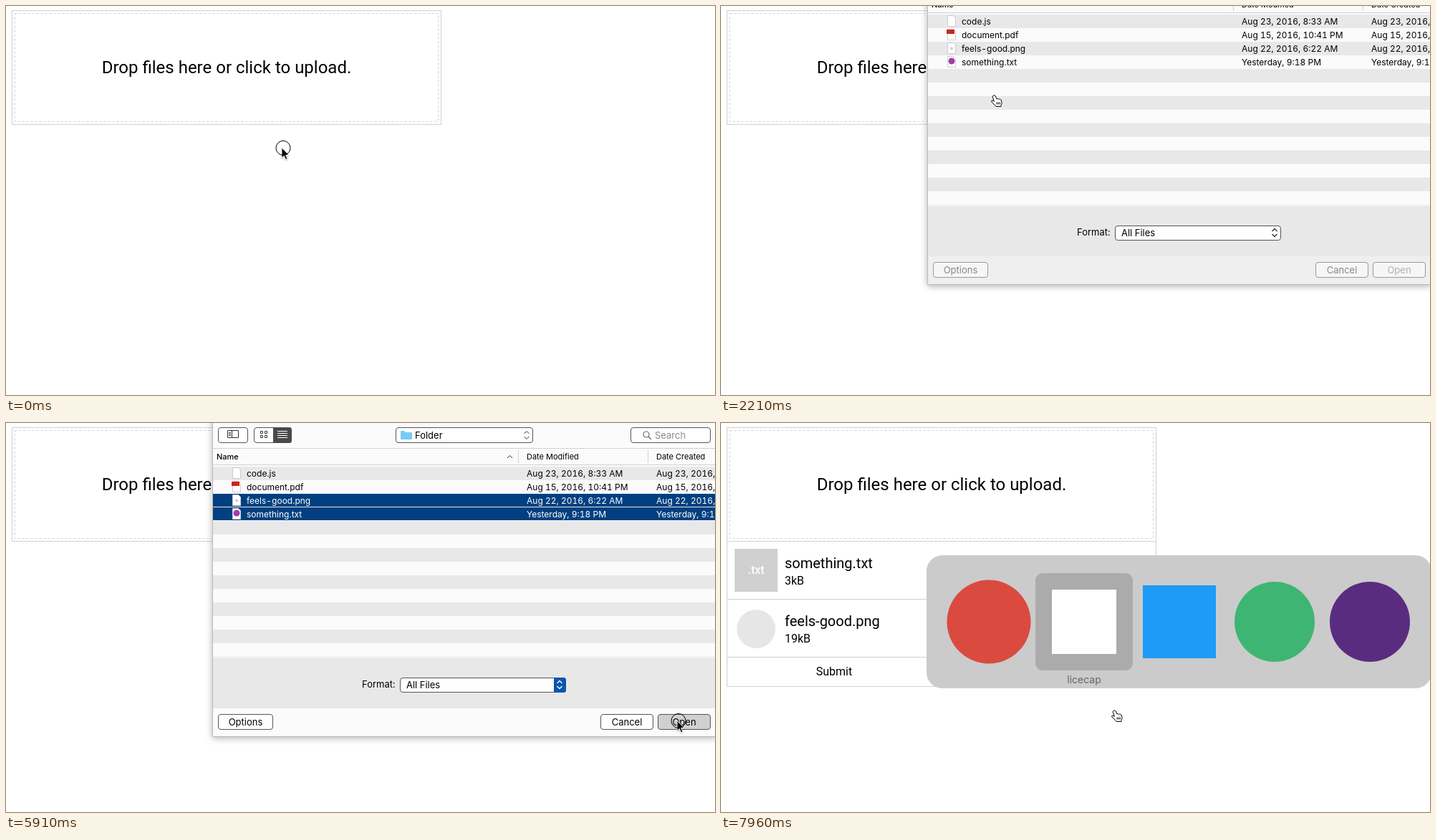
Recreate the animation shown at these times as an HTML page. Size 990x544 px, loop 8 s.

```html
<!DOCTYPE html>
<html lang="en">
<head>
<meta charset="utf-8">
<title>File upload</title>
<style>
  html, body { margin: 0; width: 100%; height: 100%; overflow: hidden; background: #fff; }
  svg { display: block; }
  text { font-family: Roboto, sans-serif; font-size: 16px; }
  .center { text-anchor: middle; }
  .title { font-size: 20px; }
  .prompt { font-size: 24px; }
  .ui text { font-family: Inter, sans-serif; font-size: 13px; font-variant-numeric: tabular-nums; }
  .ui .head { font-size: 11px; }
  .ui .cell { font-size: 12px; }
  .ui .app { font-size: 14px; }
  .sheet { filter: drop-shadow(0 3px 5px rgba(0, 0, 0, .3)); }
  .line { fill: none; stroke: #d0d0d0; }
  .control { fill: #fff; stroke: #555; }
  .icon { fill: none; stroke: #333; }
  .inactive .button { fill: #f6f6f6; stroke: #999; }
  .inactive .label { fill: #888; }
  .button.pressed { fill: #d0d0d0; }
  .inactive .label.disabled, .label.disabled { fill: #b0b0b0; }
  .inactive .accent { display: none; }
  .accent { fill: #0857ab; }
  .knob { fill: none; stroke: #fff; stroke-width: 1.4; }
  .inactive .knob { stroke: #333; }
  .mark { fill: #004080; visibility: hidden; }
  .selected { fill: #fff; }
  .selected .mark { visibility: visible; }
</style>
</head>
<body>
<svg id="stage" width="990" height="544" viewBox="0 0 990 544"></svg>
<script>
const stage = document.getElementById('stage');
const rect = (x, y, w, h, attrs) => `<rect x="${x}" y="${y}" width="${w}" height="${h}" ${attrs}/>`;
const frame = (x, y, w, h, attrs = 'class="control" rx="3.5"') => rect(x + .5, y + .5, w - 1, h - 1, attrs);
const text = (x, y, words, cls = '', attrs = '') => `<text x="${x}" y="${y}" class="${cls}" ${attrs}>${words}</text>`;
const path = (d, attrs = 'class="icon"') => `<path d="${d}" ${attrs}/>`;
const circle = (x, y, r, fill) => `<circle cx="${x}" cy="${y}" r="${r}" fill="${fill}"/>`;
const group = (id, content, attrs = '') => `<g id="${id}" ${attrs}>${content}</g>`;
const chevrons = (x, y, attrs) => path(`M${x - 3.5} ${y - 2}l3.5-3.5 3.5 3.5M${x - 3.5} ${y + 2}l3.5 3.5 3.5-3.5`, attrs);
const button = (x, w, words, id) =>
  frame(x, 407, w, 22, `id="${id}Button" class="control button" rx="3.5"`) +
  text(x + w / 2, 423, words, 'center label', `id="${id}Label"`);

const form =
  frame(8, 6, 600, 160, 'class="line"') +
  frame(12, 10, 592, 152, 'class="line" stroke-dasharray="3 3"') +
  text(308, 94, 'Drop files here or click to upload.', 'center prompt');

const uploads =
  path('M8.5 165V368.5H607.5V165M8 246.5H608M8 327.5H608', 'class="line"') +
  rect(19, 176, 60, 60, 'fill="#d0d0d0"') +
  text(49, 211, '.txt', 'center', 'fill="#fff" font-weight="500"') +
  text(89, 203, 'something.txt', 'title') + text(89, 226, '3kB') +
  circle(49, 288, 27, '#e6e6e6') +
  text(89, 284, 'feels-good.png', 'title') + text(89, 307, '19kB') +
  text(158, 353, 'Submit', 'center');

const toolbar =
  frame(296, 6, 42, 22) +
  path('M309.5 10.5h15v10h-15zM315.5 10v11M311 13.5h3M311 15.5h3M311 17.5h3') +
  frame(346, 6, 53, 22) +
  path('M373 6h22.500a3.500 3.500 0 0 1 3.500 3.500v15a3.500 3.500 0 0 1-3.500 3.500h-22.500z', 'fill="#4a4a4a"') +
  path('M355.500 11.500h3v3h-3zM361.500 11.500h3v3h-3zM355.500 17.500h3v3h-3zM361.500 17.500h3v3h-3z') +
  path('M379 11.500h14M379 14.500h14M379 17.500h14M379 20.500h14', 'stroke="#fff"') +
  frame(544, 6, 192, 22) +
  path('M551 12q0-1 1-1h4l2 2h8q1 0 1 1v8q0 1-1 1h-14q-1 0-1-1z', 'fill="#75cbf6"') +
  text(571, 22, 'Folder') + chevrons(727, 17) +
  frame(872, 6, 112, 22) +
  path('M898 16a4 4 0 1 1-8 0a4 4 0 1 1 8 0M897 19l4 4', 'fill="none" stroke="#666" stroke-width="1.2"') +
  text(906, 22, 'Search', '', 'fill="#8a8a8a"') +
  path('M288 35.500H990M288 58.500H990M715.500 38v18M896.500 38v18', 'class="line"') +
  text(294, 51, 'Name', 'head', 'font-weight="500"') +
  path('M700 49l3.500-3.500 3.500 3.500') +
  text(727, 51, 'Date Modified', 'head') + text(908, 51, 'Date Created', 'head');

const files = [
  ['code.js', 'Aug 23, 2016, 8:33 AM', ''],
  ['document.pdf', 'Aug 15, 2016, 10:41 PM', rect(315, 82, 11, 6, 'fill="#c8281e"')],
  ['feels-good.png', 'Aug 22, 2016, 6:22 AM', circle(322, 108.500, 2, '#ccc')],
  ['something.txt', 'Yesterday, 9:18 PM', circle(322, 126, 4.500, '#a23ca8')],
];
const stripes = Array.from({ length: 7 }, (_, i) => rect(288, 61 + 38 * i, 702, 19, 'fill="#e8e8e8"')).join('');
const rows = files.map(([name, date, badge], i) => {
  const y = 61 + 19 * i;
  return group('row' + i,
    rect(288, y, 702, 18, 'class="mark"') +
    path(`M316.500 ${y + 1.500}h8l3 3v12h-11z`, 'fill="#fff" stroke="#ccc"') + badge +
    text(336, y + 14, name, 'cell') + text(727, y + 14, date, 'cell') + text(908, y + 14, date, 'cell'));
}).join('');

const dialog =
  rect(288, -20, 704, 458, 'class="sheet" fill="#fbfbfb"') +
  rect(288, 399, 702, 39, 'id="footer"') +
  toolbar + stripes + rows +
  rect(288, 327, 702, 72, 'fill="#e8e8e8"') + path('M288 328.500H990', 'stroke="#f6f6f6"') +
  path('M288.500 0V438.500H990', 'fill="none" stroke="#bbb"') +
  text(497, 370, 'Format:') + frame(550, 356, 232, 21) + text(559, 371, 'All Files') +
  path('M765 356h13.500a3.500 3.500 0 0 1 3.500 3.500v14a3.500 3.500 0 0 1-3.500 3.500h-13.500z', 'class="accent"') +
  chevrons(773, 366, 'class="knob"') +
  button(296, 77, 'Options', 'options') + button(830, 74, 'Cancel', 'cancel') + button(910, 74, 'Open', 'open');

const switcher =
  rect(287, 185, 705, 186, 'rx="22" fill="#cbcbcb"') +
  rect(439, 210, 136, 136, 'rx="10" fill="#ababab"') +
  circle(374, 278, 58.500, '#db4a3f') +
  rect(462, 233, 90, 90, 'fill="#fff"') +
  rect(589, 227, 102, 102, 'fill="#1e9bf6"') +
  circle(773, 278, 56, '#3fb573') +
  circle(906, 278, 56, '#5a2c80') +
  text(507, 364, 'licecap', 'center app', 'fill="#666"');

const pointer =
  group('arrow', path('M0 0V14.500L3.300 11.500 5.600 16.800 8 15.700 5.700 10.500H10Z',
    'stroke="#fff" style="filter: drop-shadow(0 1px 1px rgba(0, 0, 0, .3))"')) +
  group('hand', path('M3.600 1.200q1.600-1 2.600.6l1.800 4.200q1.200-.9 2.300.2q1.400-.7 2.200.5q1.600-.4 2 1.200l.5 3.500q0 2-1 3.200v1.900h-7l-3-3.500-3.200-3q-.8-1.600 1-1.900l2.600 1.200-2.200-6q-.3-1.500 1-1.900z' +
    'M8.200 10.500v3M10.200 10.500v3M12.200 10.500v3', 'fill="#fff" stroke="#000"'), 'transform="translate(-5 2)"') +
  group('ring', '<circle cx="2" cy=".5" r="10" fill="none" stroke="#000"/>');

stage.innerHTML = form + group('uploads', uploads) + group('dialog', dialog, 'class="ui"') +
  group('switcher', switcher, 'class="ui"') + group('pointer', pointer);

const el = id => document.getElementById(id);
const show = (id, on) => el(id).style.display = on ? '' : 'none';
const between = (t, from, to) => t >= from && t < to;
const snap = (t, start, step) => start + step * Math.floor((t - start) / step);
const ease = p => Math.sin(Math.PI / 2 * Math.min(1, Math.max(0, p))) ** 2;

// start, end, steps, target x and y
const moves = [
  [1200, 1550, 7, 382, 122],
  [3010, 3210, 4, 362, 129],
  [3600, 3900, 6, 383, 103.500],
  [4520, 4630, 3, 863, 366],
  [4900, 5220, 6, 937, 416],
  [6230, 6440, 4, 545, 350],
  [7660, 7900, 4, 550, 399],
];
const clicks = [[0, 60], [1780, 1840], [3540, 3600], [4200, 4260], [5910, 5990]];

function pointerAt(t) {
  let x = 385, y = 198;
  for (const [start, end, steps, toX, toY] of moves) {
    if (t < start) break;
    const done = Math.min(1, (Math.floor((t - start) / (end - start) * (steps - 1)) + 1) / steps);
    x += (toX - x) * done;
    y += (toY - y) * done;
  }
  return [Math.round(x), Math.round(y)];
}

function dialogBottom(t) {
  if (!between(t, 2010, 6215)) return 0;
  if (t < 2250) return Math.floor(438 * ease((snap(t, 2010, 60) - 1994) / 250));
  if (t >= 5990) return Math.floor(438 * ease(1 - (snap(t, 5990, 75) - 5978) / 250));
  return 438;
}

function draw(t) {
  const bottom = dialogBottom(t);
  show('dialog', bottom > 0);
  el('dialog').setAttribute('transform', `translate(0 ${bottom - 438})`);
  el('dialog').classList.toggle('inactive', t < 2410);
  el('footer').setAttribute('fill', between(t, 2410, 5990) ? '#fbfbfb' : '#efefef');
  el('row3').classList.toggle('selected', t >= 3540);
  el('row2').classList.toggle('selected', t >= 4200);
  el('openLabel').classList.toggle('disabled', t < 3540);
  el('openButton').classList.toggle('pressed', t >= 5910);
  show('uploads', t >= 6320);
  show('switcher', t >= 7900);

  const [x, y] = pointerAt(t);
  const overLink = t < 2410 ? y < 166 : t >= 6440;
  el('pointer').setAttribute('transform', `translate(${x} ${y})`);
  show('hand', overLink);
  show('arrow', !overLink);
  show('ring', clicks.some(([from, to]) => between(t, from, to)));
}

function tick() {
  draw(performance.now() % 8000);
  requestAnimationFrame(tick);
}
tick();
</script>
</body>
</html>
```
